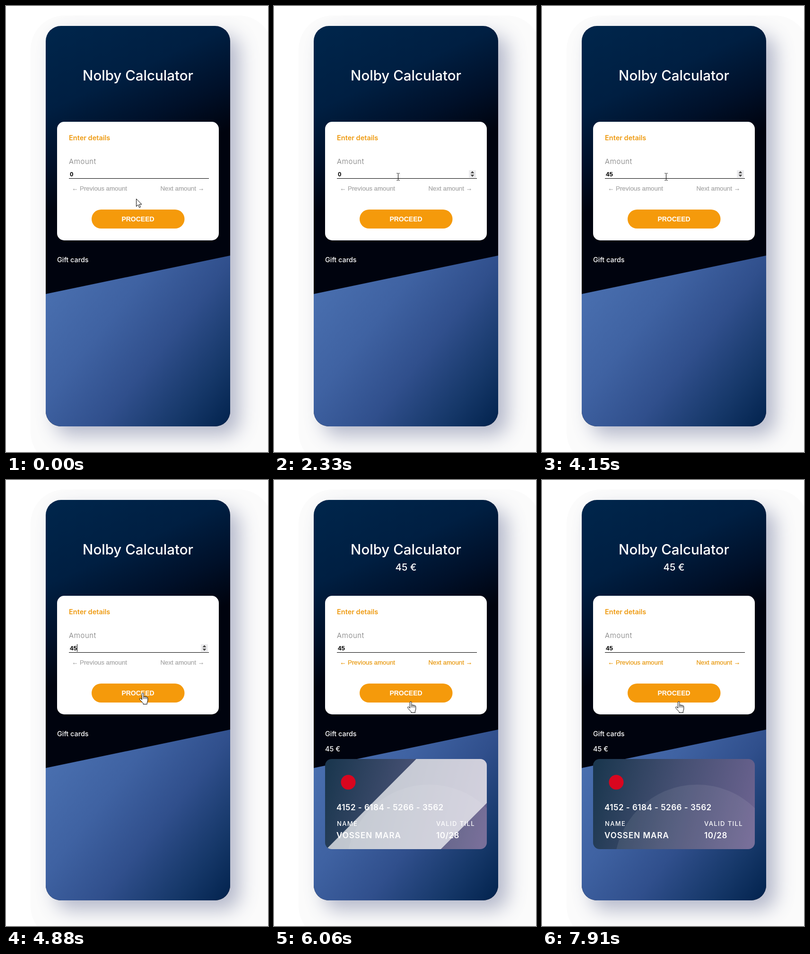
Animation of 554 by 940 pixels, one loop 7940 ms. Source, as an HTML page:

```html
<!DOCTYPE html>
<html lang="en">
<head>
<meta charset="utf-8">
<title>Gift card calculator</title>
<style>
  html, body { margin: 0; width: 100%; height: 100%; overflow: hidden; background: #fff; }
  svg { display: block; width: 554px; height: 940px; }
  text { font-family: Inter, "Open Sans", sans-serif; font-weight: 500; fill: #fff; }
  .arial { font: 13.333px "Liberation Sans", Arial, sans-serif; }
  .bold { font-weight: 700; }
  .link { fill: #a6a6a6; stroke: #a6a6a6; stroke-width: .25px; }
  .ready .link { fill: #e8990f; stroke: #e8990f; }
  .shadow { fill: #4b5582; opacity: .4; filter: blur(20px); }
  .strong { font-size: 17px; font-weight: 600; letter-spacing: .5px; }
  .label { font-size: 13px; letter-spacing: 1.4px; }
  .result { visibility: hidden; }
  .ready .result { visibility: visible; }
  .cursor { fill: #fff; stroke: #000; stroke-linejoin: round; }
</style>
</head>
<body>
<svg id="stage" viewBox="0 0 554 940">
  <defs>
    <linearGradient id="night" gradientUnits="userSpaceOnUse" x1="110" y1="30" x2="261" y2="358">
      <stop offset="0" stop-color="#00264c"/>
      <stop offset=".45" stop-color="#001f42"/>
      <stop offset=".75" stop-color="#001029"/>
      <stop offset="1" stop-color="#00030e"/>
    </linearGradient>
    <linearGradient id="wall" gradientUnits="userSpaceOnUse" x1="84" y1="590" x2="474" y2="900">
      <stop offset="0" stop-color="#4a70b0"/>
      <stop offset=".3" stop-color="#3f62a2"/>
      <stop offset=".55" stop-color="#304f8c"/>
      <stop offset=".8" stop-color="#153768"/>
      <stop offset="1" stop-color="#00204a"/>
    </linearGradient>
    <linearGradient id="plastic" gradientUnits="userSpaceOnUse" x1="108" y1="630" x2="450" y2="720">
      <stop offset="0" stop-color="#1b374f"/>
      <stop offset=".5" stop-color="#465073"/>
      <stop offset="1" stop-color="#6c6390"/>
    </linearGradient>
    <clipPath id="phone"><rect x="84" y="42" width="390" height="844" rx="32"/></clipPath>
    <clipPath id="card"><rect x="108" y="588" width="342" height="190" rx="14"/></clipPath>
  </defs>

  <rect x="52" y="20" width="512" height="950" rx="72" fill="#fbfbfb"/>
  <rect class="shadow" x="104" y="62" width="390" height="844" rx="32"/>
  <g clip-path="url(#phone)">
    <rect x="84" y="42" width="390" height="844" fill="url(#night)"/>
    <path d="M84 607L474 526V886H84z" fill="url(#wall)"/>
  </g>

  <text x="279" y="157" font-size="29.5" text-anchor="middle">Nolby Calculator</text>
  <text class="result" x="279" y="191" font-size="20.5" text-anchor="middle">45 €</text>

  <rect x="108" y="244" width="342" height="250" rx="15" fill="#fff"/>
  <text x="133" y="283" font-size="14.5" style="fill:#ee9a10;font-weight:600">Enter details</text>
  <text x="133" y="333" font-size="15" letter-spacing=".6" style="fill:#777;font-weight:300">Amount</text>
  <text id="amount" class="arial bold" x="135" y="359" style="fill:#000"></text>
  <rect x="133" y="363" width="296" height="1"/>
  <rect id="caret" y="346" width="1" height="16"/>
  <g id="spinner">
    <rect x="412" y="346" width="15" height="16" fill="#ececee"/>
    <path d="M415.500 352.500h8l-4-4.500zM415.500 355.500h8l-4 4.500z" fill="#444"/>
  </g>
  <text class="arial link" x="139" y="389">← Previous amount</text>
  <text class="arial link" x="419" y="389" text-anchor="end">Next amount →</text>
  <rect x="181" y="429" width="196.500" height="40" rx="20" fill="#f59a0b"/>
  <text class="arial bold" x="279" y="454" text-anchor="middle" style="font-size:14px">PROCEED</text>

  <text x="108" y="540" font-size="14.4">Gift cards</text>
  <g class="result">
    <text x="108" y="572" font-size="14.5">45 €</text>
    <g clip-path="url(#card)">
      <rect x="108" y="588" width="342" height="190" fill="url(#plastic)"/>
      <circle cx="328" cy="817" r="175" fill="#fff" opacity=".08"/>
      <circle cx="157" cy="637" r="15.500" fill="#d9061f"/>
      <text class="strong" x="132" y="696">4152 - 6184 - 5266 - 3562</text>
      <text class="label" x="133" y="729">NAME</text>
      <text class="label" x="343" y="729">VALID TILL</text>
      <text class="strong" x="132" y="755" style="letter-spacing:1px">VOSSEN MARA</text>
      <text class="strong" x="343" y="755">10/28</text>
      <path id="shine" d="M-588 588h242l-190 190h-242z" fill="#fff" opacity=".7"/>
    </g>
  </g>

  <g id="arrow" class="cursor"><path d="M.5.5V16.500l3.800-3.600 2.600 6 2.600-1.200-2.600-5.700H12z"/></g>
  <g id="beam" class="cursor"><path fill="none" d="M-2.500-7.500H-.5L.5-6.500 1.500-7.500H3.500M.5-6.500V6.500M-2.500 7.500H-.5L.5 6.500 1.500 7.500H3.500"/></g>
  <g id="hand" class="cursor">
    <path d="M-1.500 14V1.800a1.750 1.750 0 0 1 3.500 0V8.500a1.600 1.600 0 0 1 3.200.3a1.600 1.600 0 0 1 3.200.5a1.400 1.400 0 0 1 2.400 1V16q0 2-1.500 4V23.500H1V21.500L-5.500 14.500q-2-2.500 0-3.500q1.700-.4 4 3z"/>
    <path fill="none" d="M2 8.500v4M5.200 9v3.500M8.400 9.500v3"/>
  </g>
</svg>
<script>
const LOOP = 7940, FOCUS = 1700, RESULT = 5820;
const $ = id => document.getElementById(id);
const show = (id, on) => $(id).setAttribute('visibility', on ? 'visible' : 'hidden');
const move = (id, x, y) => $(id).setAttribute('transform', `translate(${x} ${y})`);
const part = (t, from, to) => Math.min(1, Math.max(0, (t - from) / (to - from)));
const smooth = p => p * p * (3 - 2 * p);

// Pointer moves: start, end, target x, target y
const moves = [[350, 950, 262, 360], [4150, 4700, 289, 449], [5050, 5400, 289, 467]];
// Field contents from a given time on
const edits = [[0, '0'], [FOCUS, '0'], [2500, ''], [2850, '4'], [3450, '45']];

function pointer(t) {
  let x = 275, y = 406;
  for (const [from, to, tx, ty] of moves) {
    const p = smooth(part(t, from, to));
    x += (tx - x) * p;
    y += (ty - y) * p;
  }
  return [Math.round(x), Math.round(y)];
}

function draw(t) {
  const [x, y] = pointer(t);
  const kind = y < 365 ? 'beam' : y >= 429 ? 'hand' : 'arrow';
  for (const id of ['arrow', 'beam', 'hand']) {
    show(id, id === kind);
    move(id, x, y);
  }

  const [since, value] = edits.filter(e => e[0] <= t).pop();
  const focused = t >= FOCUS && t < RESULT;
  $('amount').textContent = value;
  $('caret').setAttribute('x', 135 + Math.round(value.length * 7.4));
  show('caret', focused && (t - since) % 1000 < 500);
  show('spinner', focused || kind === 'beam');

  $('stage').classList.toggle('ready', t >= RESULT);
  const p = part(t, RESULT, RESULT + 713);
  move('shine', 454 + 774 * (1 - (1 - p) ** 2), 0);
}

const start = performance.now();
function frame() {
  draw((performance.now() - start) % LOOP);
  requestAnimationFrame(frame);
}
frame();
</script>
</body>
</html>
```
